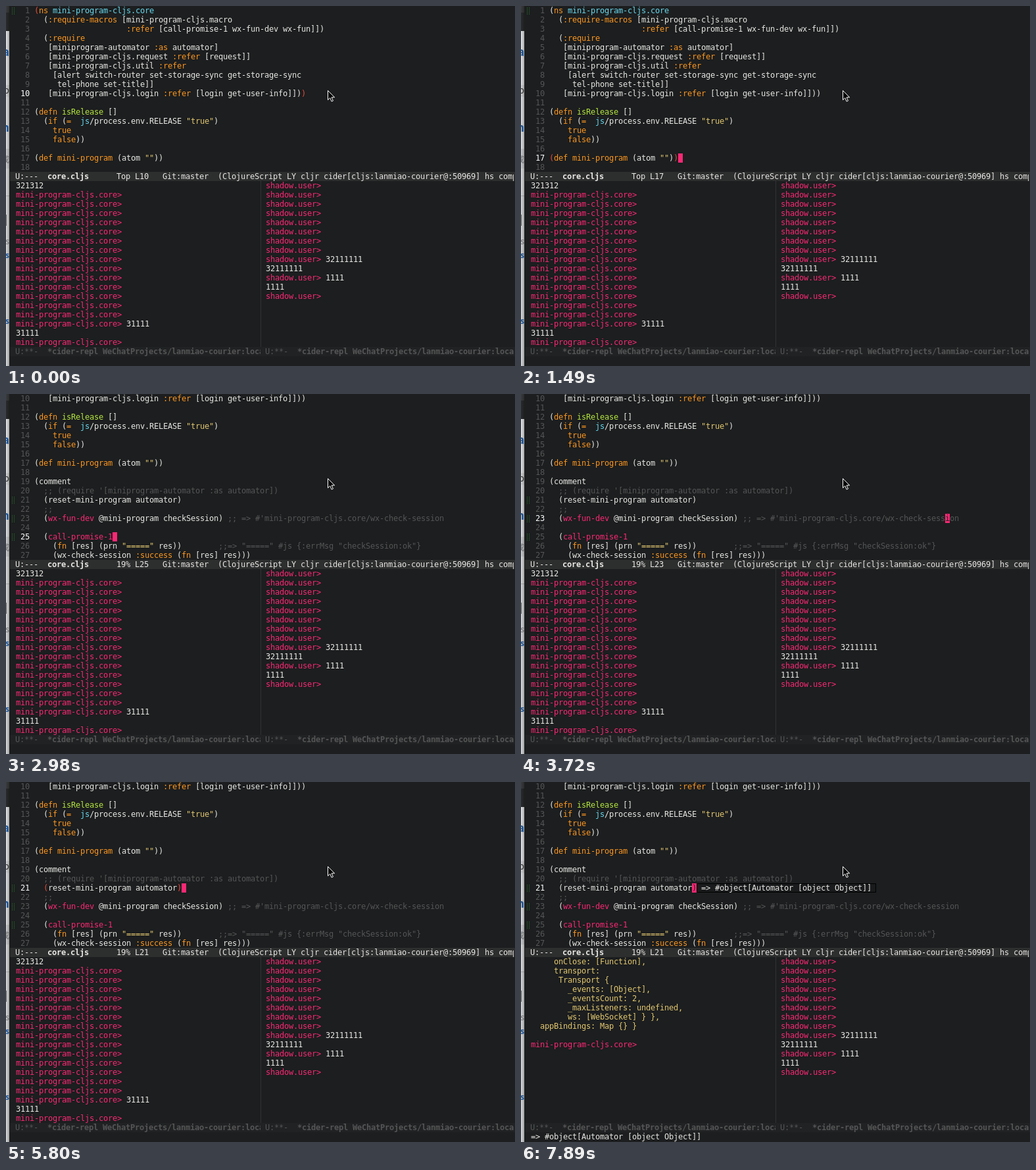
Animation, 774 px wide and 547 px high, one loop 8000 ms. Source, as an HTML page:

```html
<!DOCTYPE html>
<html lang="en">
<head>
<meta charset="utf-8">
<title>REPL session</title>
<style>
  html, body { margin: 0; width: 100%; height: 100%; overflow: hidden; background: #1c1e1f; }
  #stage {
    position: relative; width: 774px; height: 547px; overflow: hidden;
    background: #1c1e1f; color: #e8e8e4;
    font: 12px/14px "DejaVu Sans Mono", monospace;
    letter-spacing: calc(7px - 1ch); font-variant-ligatures: none;
  }
  #stage div, #stage svg { position: absolute; }
  .pane, .bar { white-space: pre; overflow: hidden; }
  .pane div { left: 0; height: 14px; }
  .bar { height: 14px; }
  #code { left: 15px; top: 0; width: 757px; height: 252px; }
  #left { left: 15px; top: 266px; width: 372px; height: 252px; }
  #right { left: 395px; top: 266px; width: 377px; height: 252px; }
  #echo { left: 15px; top: 532px; width: 757px; }
  .bg { background: #2d2e2e; height: 14px; left: 6px; width: 768px; }
  .dim { color: #555556; }
  .split { left: 387px; top: 266px; width: 1px; height: 252px; background: #303233; }
  .n, .c { color: #555556; }
  .on { color: #fff; }
  .o { color: #fd971f; }
  .g { color: #b6e63e; }
  .t { color: #66d9ef; }
  .y { color: #e2c770; }
  .p { color: #fb2874; }
  .m { color: #e74c3c; }
  .cur, .res { display: inline-block; height: 14px; vertical-align: top; }
  .cur { background: #fb2874; color: #1c1e1f; }
  .res { background: #191b1c; box-shadow: inset 0 0 0 1px #000; }
  .dots {
    left: 9px; width: 4px; height: 12px; opacity: .75;
    background: repeating-linear-gradient(#1c1e1f 0 1px, transparent 1px 2px),
                repeating-linear-gradient(90deg, #2c8a2c 0 1px, #1c1e1f 1px 3px);
  }
  #page {
    left: 0; top: 0; width: 5px; height: 547px; overflow: hidden; letter-spacing: 0;
    background: linear-gradient(#3a3b3c 0 10px, #292b2c 10px 38px, #e4e5e6 38px 120px, #d6d7d8 120px 138px,
      #e0e1e2 138px 217px, #cfd0d1 217px 247px, #dddedf 247px 288px, #b5b6b7 288px 289px, #d9dadb 289px 547px);
  }
  #page::after { content: ""; position: absolute; inset: 0; background: linear-gradient(90deg, #0000, #0004); }
  #page div { font-family: "Noto Sans", "Noto Sans CJK SC", sans-serif; line-height: 20px; right: 0; }
</style>
</head>
<body>
<div id="stage">
  <div id="page"></div>
  <div id="fringe"></div>
  <div id="code" class="pane"></div>
  <div class="bg" style="top:252px"></div>
  <div id="mode" class="bar" style="left:14px;top:252px;width:758px"></div>
  <div id="left" class="pane"></div>
  <div class="split"></div>
  <div id="right" class="pane"></div>
  <div class="bg" style="top:518px;background:#202223"></div>
  <div class="bar dim" style="left:14px;top:518px;width:373px"></div>
  <div class="bar dim" style="left:394px;top:518px;width:378px"></div>
  <div id="echo" class="bar"></div>
  <svg width="14" height="22" style="left:488px;top:127px">
    <path d="M1.5 1.5v14.2l3.3-3.1 2.3 5.4 2.3-1-2.3-5.2h4.5z" fill="#000" stroke="#fff"/>
  </svg>
</div>
<script>
const LOOP = 8000, ROWS = 18, GOAL = 86;
const $ = id => document.getElementById(id);

const source = `(ns mini-program-cljs.core
  (:require-macros [mini-program-cljs.macro
                    :refer [call-promise-1 wx-fun-dev wx-fun]])
  (:require
   [miniprogram-automator :as automator]
   [mini-program-cljs.request :refer [request]]
   [mini-program-cljs.util :refer
    [alert switch-router set-storage-sync get-storage-sync
     tel-phone set-title]]
   [mini-program-cljs.login :refer [login get-user-info]]))

(defn isRelease []
  (if (=  js/process.env.RELEASE "true")
    true
    false))

(def mini-program (atom ""))

(comment
  ;; (require '[miniprogram-automator :as automator])
  (reset-mini-program automator)
  ;;
  (wx-fun-dev @mini-program checkSession) ;; => #'mini-program-cljs.core/wx-check-session

  (call-promise-1
    (fn [res] (prn "=====" res))        ;;=> "=====" #js {:errMsg "checkSession:ok"}
    (wx-check-session :success (fn [res] res)))`.split("\n");

// Later rules paint over earlier ones.
const rules = [
  [/:[\w-]+|\b(true|false)\b/g, "o"],
  [/(?<=\()(ns|defn?|if|=|fn)(?= )/g, "o"],
  [/(?<=\(def )\S+/g, "o"],
  [/(?<=\(defn )\S+/g, "g"],
  [/(?<=\(ns )\S+|\bjs(?=\/)/g, "t"],
  [/(?<=\()(wx-fun-dev|call-promise-1)/g, "p"],
  [/"[^"]*"/g, "y"],
  [/;.*/g, "c"]
];
const paint = source.map(text => {
  const cells = Array(text.length).fill("");
  for (const [re, cls] of rules)
    for (const hit of text.matchAll(re)) cells.fill(cls, hit.index, hit.index + hit[0].length);
  return cells;
});

// time, line, column, options
const off = { blink: true };
const steps = [
  [0, 10, 59, off],
  [140, 10, 59, { result: "mini-program-cljs.core" }],
  [590, 11, GOAL], [1040, 12, GOAL], [1190, 13, GOAL], [1340, 15, GOAL], [1490, 17, GOAL],
  [1640, 19, GOAL], [1780, 21, GOAL], [1930, 23, GOAL], [2080, 25, GOAL], [2230, 26, GOAL],
  [2530, 27, GOAL], [2830, 26, GOAL], [2980, 25, GOAL], [3120, 24, GOAL], [3270, 23, GOAL],
  [3870, 23, 0], [4170, 23, 2], [4610, 23, 2, off],
  [5060, 22, 2], [5360, 21, 2, { noMatch: true }], [5500, 21, 2], [5800, 21, 32],
  [6250, 21, 31, { result: "#object[Promise [object Promise]]" }],
  [6550, 21, 31], [7150, 21, 31, off], [7590, 21, 31],
  [7890, 21, 31, { result: "#object[Automator [object Object]]" }]
];
const SCROLL_AT = 1640, OUTPUT_AT = 6550;

const esc = s => s.replace(/&/g, "&amp;").replace(/</g, "&lt;").replace(/>/g, "&gt;");
const span = (cls, s) => cls ? `<span class="${cls}">${esc(s)}</span>` : esc(s);
const rows = list => list.map((html, i) => `<div style="top:${i * 14}px">${html}</div>`).join("");

// The bracket pair at the cursor, as [row, column] places.
function findPair(row, col) {
  const text = source[row];
  const forward = "([{".includes(text[col] || " ");
  if (!forward && !")]}".includes(text[col - 1] || " ")) return [];
  const dir = forward ? 1 : -1, start = [row, forward ? col : col - 1];
  let depth = 0;
  for (let r = row, c = start[1]; source[r] !== undefined;) {
    const ch = source[r][c] || " ";
    if ("([{".includes(ch)) depth += dir;
    if (")]}".includes(ch)) depth -= dir;
    if (!depth) return [start, [r, c]];
    c += dir;
    if (c < 0 || c >= source[r].length) {
      r += dir;
      c = forward || !source[r] ? 0 : source[r].length - 1;
    }
  }
  return [start];
}

function lineHtml(row, state) {
  const text = source[row], cells = [...paint[row]], here = row === state.row;
  for (const [r, c] of state.pair) if (r === row) cells[c] = "m";
  if (here && !state.blink && state.col < text.length) cells[state.col] = "cur";
  let html = span(here ? "on" : "n", String(row + 1).padStart(3) + " ");
  for (let i = 0, j; i < text.length; i = j) {
    for (j = i + 1; j < text.length && cells[j] === cells[i];) j++;
    html += span(cells[i], text.slice(i, j));
  }
  if (!here) return html;
  const atEnd = !state.blink && state.col === text.length;
  if (atEnd) html += span("cur", " ");
  if (state.result) html += span("res", (atEnd ? "" : " ") + `=> ${state.result} `);
  return html;
}

const prompt = (name, typed = "") => span("p", name + ">") + " " + typed;
const core = typed => prompt("mini-program-cljs.core", typed);
const user = typed => prompt("shadow.user", typed);
const history = ["321312", ...Array(14).fill(core()), core("31111"), "31111", core()];
const output = [
  ...`     onClose: [Function],
     transport:
      Transport {
        _events: [Object],
        _eventsCount: 2,
        _maxListeners: undefined,
        ws: [WebSocket] } },
  appBindings: Map {} }`.split("\n").map(s => span("y", s)), "", core()
];

function draw([time, line, goal, opts = {}]) {
  const row = line - 1, col = Math.min(goal, source[row].length);
  const state = { row, col, ...opts, pair: opts.noMatch ? [] : findPair(row, col) };
  const top = time < SCROLL_AT ? 0 : 9;
  const shown = Array.from({ length: ROWS }, (_, i) => top + i);
  $("code").innerHTML = rows(shown.map(r => lineHtml(r, state)));
  $("fringe").innerHTML = [1, 21, 23, 25].map(n => n - 1 - top).filter(r => r >= 0 && r < ROWS)
    .map(r => `<div class="dots" style="top:${r * 14 + 1}px"></div>`).join("");
  $("mode").innerHTML = `U:---  <b>core.cljs</b>      ${top ? "19%" : "Top"} L${line}   Git:master  ` +
    "(ClojureScript LY cljr cider[cljs:lanmiao-courier@:50969] hs company)";
  $("left").innerHTML = rows(time < OUTPUT_AT ? history : output);
  $("echo").textContent = opts.result ? "=> " + opts.result : "";
}

$("right").innerHTML = rows([...Array(8).fill(user()), user("32111111"), "32111111", user("1111"), "1111", user()]);
document.querySelectorAll(".bar.dim").forEach(bar => {
  bar.innerHTML = "U:**-  <b>*cider-repl WeChatProjects/lanmiao-courier:localhost</b>";
});

// Slivers of the page behind the editor window.
const blue = "#1d5fae", grey = "#77797b";
$("page").innerHTML = [
  [60, "a", blue, 17, 700], [118, "o", "#333", 14, 400], [175, "h", blue, 17, 700], [224, "或", grey, 12, 400],
  [348, "s", grey, 12, 400], [369, "s", blue, 12, 700], [469, "s", blue, 12, 700]
].map(([y, s, color, size, weight]) =>
  `<div style="top:${y}px;color:${color};font-size:${size}px;font-weight:${weight}">${s}</div>`).join("") +
  `<div style="left:0;top:317px;width:1px;height:17px;background:#666"></div>`;

let current;
const began = performance.now();
function tick() {
  const t = (performance.now() - began) % LOOP;
  const step = steps.findLast(s => s[0] <= t) || steps[0];
  if (step !== current) draw(current = step);
  requestAnimationFrame(tick);
}
tick();
</script>
</body>
</html>
```
